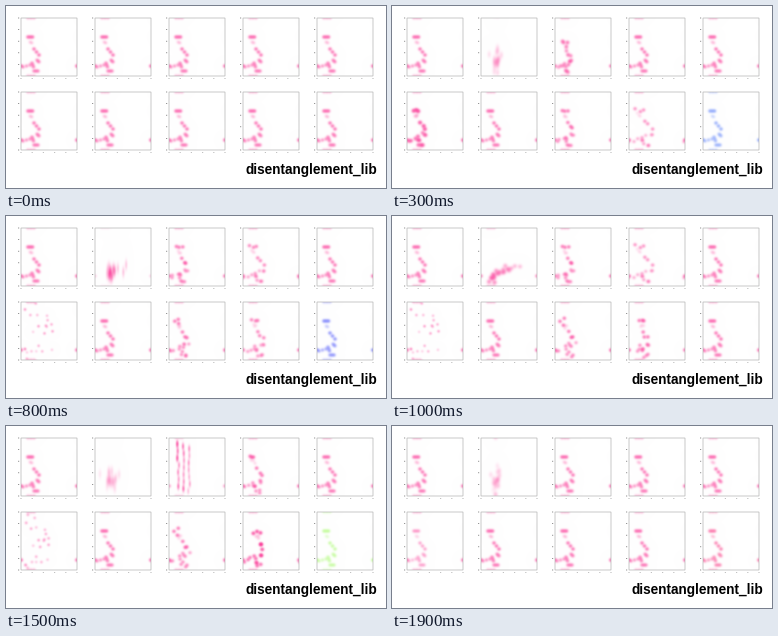
A matplotlib script that plays this animation: 380 by 182 pixels, repeating every 2000 ms.

```python
import colorsys

import numpy as np
import matplotlib.pyplot as plt
from matplotlib.animation import FuncAnimation
from matplotlib.patches import Rectangle

W, H, DPI = 380, 182, 100
FRAMES, STEP = 20, 100
PW, PH = 56, 58
LEFT = [15 + 74 * i for i in range(5)]
TOP = [12, 86]
PER_STROKE, FIXED = 3, 6
HUES = ([-1, -.8, -.4, 0, .6, 1], [95, 75, -22, -29, -125, -142])

# Strokes as x0, y0, x1, y1, strength; the first two stay at the panel edges.
STROKES = [
    (7, 0, 13, 0, .25), (0, 48, 0, 48, .25),
    (7, 19, 11.5, 19, .6), (9, 24, 11, 25, .12), (13, 31, 18, 37, .6),
    (16, 42, 18, 44, .35), (11, 45, 12.5, 49, .45), (2, 49, 9, 47, .4),
    (13, 53, 17, 53, .45),
]


def sample(strokes):
    """Rows of x, y, width, height, strength."""
    return np.array([(x0 + (x1 - x0) * u, y0 + (y1 - y0) * u, 1.35, 1.3, a)
                     for x0, y0, x1, y1, a in strokes
                     for u in np.linspace(0, 1, PER_STROKE)])


base = sample(STROKES)
COUNT = len(base) - FIXED


def vary(seed=0, jitter=0, dx=0, spread=1, bend=0, gain=1, size=1):
    """The base figure, shaken, widened or slanted."""
    rng = np.random.default_rng(seed)
    out = base.copy()
    body = out[FIXED:]
    x, y = body[:, 0], body[:, 1]
    body[:, 0] = (13 + dx + (x - 13) * spread + bend * (y - 36) / 18
                  + rng.normal(0, jitter, COUNT))
    body[:, 1] += rng.normal(0, jitter, COUNT)
    body[:, 2:4] *= size
    body[:, 4] *= gain
    return out


def place(x, y, sx, sy, strength, edge=0):
    """Free spots instead of the figure; edge keeps the fixed ones."""
    out = base.copy()
    out[:FIXED, 4] *= edge
    for col, value in enumerate((x, y, sx, sy, strength)):
        out[FIXED:, col] = value
    return out


def cloud(seed, cx, cy, rx, ry, sx, sy, strength, edge=0):
    rng = np.random.default_rng(seed)
    x = np.clip(rng.normal(cx, rx, COUNT), 4, 40)
    y = np.sort(rng.normal(cy, ry, COUNT))
    return place(x, y, sx, sy, strength * rng.uniform(.4, 1.5, COUNT), edge)


def tail(seed):
    rng = np.random.default_rng(seed)
    u = np.linspace(1, 0, COUNT)
    return place(11 + 27 * u ** 2 + rng.normal(0, 1.5, COUNT),
                 51 - 13 * u + rng.normal(0, 2.5, COUNT),
                 1.6, 1.6, .5 - .25 * u, .7)


def columns(seed):
    rng = np.random.default_rng(seed)
    col = np.arange(COUNT) % 3
    return place(9 + 5.5 * col + rng.normal(0, .5, COUNT),
                 np.linspace(6, 53, COUNT), .95, 2.3,
                 .75 * .75 ** col * rng.uniform(.5, 1.3, COUNT), .6)


faint = vary(gain=.6)
mist = cloud(1, 15, 44, 4, 6, 1.5, 2, .13)
fog = cloud(2, 16, 41, 4.5, 4.5, 1.2, 3.2, .12)
stripes = cloud(3, 17, 43, 5, 2.5, .7, 4.5, .15)
sag = vary(4, .8, bend=-1, gain=.95)
heap = cloud(5, 11, 46, 4, 8, 1.5, 1.6, .5, .8)
loose = vary(6, 2, spread=1.3)
crowd = vary(7, 1.6, spread=1.1, gain=2, size=1.15)
scatter = cloud(8, 18, 26, 9, 15, 1.1, 1.1, .3, 1)
clump = vary(9, 1.8, spread=1.1)
pile = vary(10, 1.8, bend=-2, gain=1.7, size=1.1)
wide = vary(11, 1.5, dx=2, spread=1.5, gain=.75)
column = vary(12, 1.3, dx=2, spread=.8)
stairs = vary(13, 1.2, dx=2, bend=-3, gain=1.5)

still = [(0, base), (20, base)]
TRACKS = [
    still,
    [(0, base), (1, mist), (2, mist), (5, fog), (7, stripes), (10, tail(14)),
     (13, stripes), (15, fog), (18, mist), (19, mist), (20, base)],
    [(0, base), (2, sag), (5, heap), (8, sag), (10, sag), (13, loose),
     (15, columns(15)), (17, loose), (19, base), (20, base)],
    [(0, base), (5, base), (10, wide), (13, loose), (17, base), (20, base)],
    still,
    [(0, base), (2, crowd), (4, base), (5, faint), (8, scatter),
     (14, scatter), (19, faint), (20, base)],
    still,
    [(0, base), (2, sag), (5, base), (10, clump), (13, pile), (15, clump),
     (18, base), (20, base)],
    [(0, base), (2, wide), (5, wide), (10, column), (13, stairs),
     (15, stairs), (18, base), (20, base)],
    still,
]


def pose(track, k):
    for (k0, s0), (k1, s1) in zip(track, track[1:]):
        if k0 <= k <= k1:
            return s0 + (s1 - s0) * (k - k0) / (k1 - k0)


yy, xx = np.mgrid[0:PH, 0:PW] + .5


def density(spots):
    """Sum of soft spots that wrap around the panel edges."""
    out = np.zeros((PH, PW))
    for x, y, sx, sy, a in spots:
        dx = (xx - x + PW / 2) % PW - PW / 2
        dy = (yy - y + PH / 2) % PH - PH / 2
        out += a * np.exp(-.5 * ((dx / sx) ** 2 + (dy / sy) ** 2))
    return out


def tint(z):
    hue = np.interp(z, *HUES) / 360 % 1
    return np.array(colorsys.hsv_to_rgb(hue, .87 - .3 * abs(z), .98))


def render(k):
    canvas = np.ones((H, W, 3))
    for i, track in enumerate(TRACKS):
        x, y = LEFT[i % 5], TOP[i // 5]
        last = i == len(TRACKS) - 1
        colour = tint(np.sin(2 * np.pi * k / FRAMES) if last else 0)
        cover = 1 - np.exp(-density(pose(track, k)))
        canvas[y:y + PH, x:x + PW] = 1 - cover[..., None] * (1 - colour)
    return canvas


fig = plt.figure(figsize=(W / DPI, H / DPI), dpi=DPI, facecolor="white")
ax = fig.add_axes([0, 0, 1, 1])
ax.axis("off")
image = ax.imshow(render(0), extent=(0, W, H, 0), interpolation="nearest",
                  aspect="auto")
ax.set_xlim(0, W)
ax.set_ylim(H, 0)

for y in TOP:
    for x in LEFT:
        ax.add_patch(Rectangle((x, y), PW, PH, fill=False, ec="0.7", lw=.5,
                               snap=False))
        for u in np.linspace(0, 1, 6):
            tx, ty = x + u * PW, y + u * PH
            ax.plot([tx - .6, tx + .6], [y + PH + 2.5] * 2, color="0.65",
                    lw=.5, solid_capstyle="butt", snap=False)
            ax.plot([x - 3, x - 1.8], [ty, ty], color="0.4", lw=.5,
                    solid_capstyle="butt", snap=False)

ax.text(239.5, 168, "disentanglement_lib", family="Liberation Sans",
        weight="bold", size=13.6 * 72 / DPI, color="black", va="baseline")


def update(k):
    image.set_data(render(k))
    return [image]


anim = FuncAnimation(fig, update, frames=FRAMES, interval=STEP, repeat=True,
                     repeat_delay=0, blit=False)
plt.show()
```
